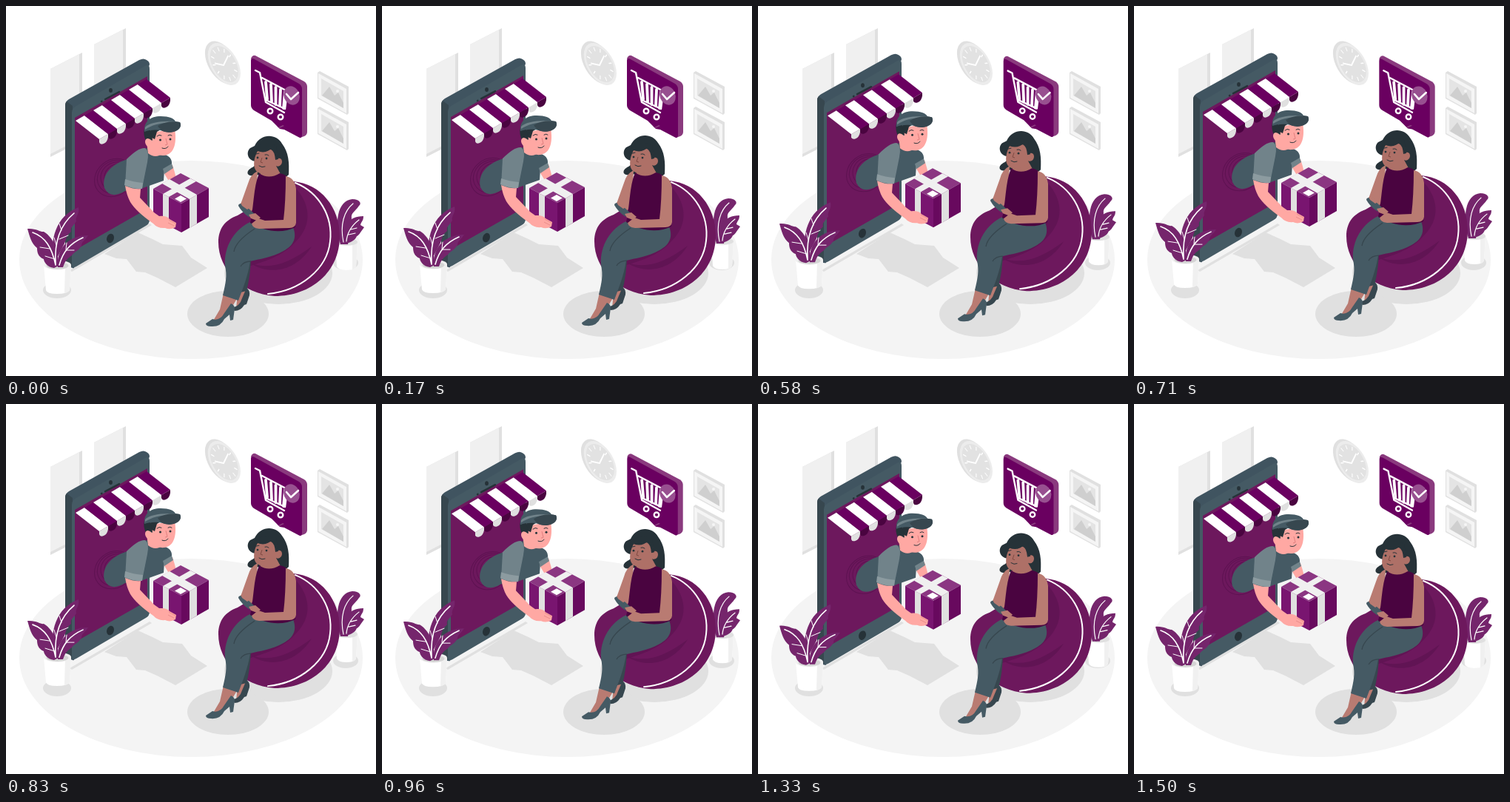
An HTML page that plays this animation: 500 by 500 pixels, repeating every 1.54 s.

```html
<!DOCTYPE html>
<html lang="en">
<head>
<meta charset="utf-8">
<title>Delivery from the screen</title>
<style>
  html, body { margin: 0; width: 100%; height: 100%; overflow: hidden; background: #fff; }
  svg { display: block; width: 100vw; height: 100vh; }
  .plum { fill: #6d185d; } .vivid { fill: #6a0060; } .deep { fill: #4a0440; } .lilac { fill: #8a3a7e; }
  .leaf { fill: #75256c; }
  .slate { fill: #455a64; } .dark { fill: #37474f; } .ink { fill: #263238; } .steel { fill: #71838a; }
  .pink { fill: #ffa8a3; } .tan { fill: #b97b72; } .brown { fill: #ae7067; }
  .grey { fill: #e0e0e0; } .pale { fill: #f0f0f0; } .white { fill: #fff; }
  .line { fill: none; stroke: #fff; stroke-linecap: round; stroke-linejoin: round; }
  .fine { fill: none; stroke: #263238; stroke-linecap: round; }
</style>
</head>
<body>
<svg viewBox="0 0 500 500">
  <defs>
    <g id="picture">
      <path class="grey" d="M421 90l3-2 39 21v36l-2 2-40-22z"/>
      <path fill="#f5f5f5" d="M422 91l38 21v33l-38-21z"/>
      <path fill="#e4e4e4" d="M426 98l30 17v23l-30-17z"/>
      <path fill="#cfcfcf" d="M427 121l10-12 7 12 5-4 7 14v7z"/>
      <circle cx="448" cy="115" r="2" fill="#f5f5f5"/>
    </g>
  </defs>

  <!-- room -->
  <ellipse cx="250" cy="343" rx="232" ry="134" fill="#f4f4f4"/>
  <g id="window">
    <path class="grey" d="M60 85l43-22v119l-43 22z"/>
    <path class="pale" d="M60 85l39-20v115l-39 20z"/>
  </g>
  <use href="#window" x="59" y="-33"/>
  <use href="#picture"/>
  <use href="#picture" y="48"/>
  <g transform="matrix(.866 .5 0 1 294 78)" id="clock">
    <circle cx="-3" r="26" class="grey"/>
    <circle cx="1" r="25.5" fill="#ececec"/>
    <circle cx="1" r="22" fill="#e2e2e2"/>
    <path class="line" stroke-width="1.8" d="M-13 6L0 2 7-14"/>
  </g>

  <!-- shadows -->
  <g class="grey">
    <path d="M86 357L194 294l3 2-108 63z"/>
    <path d="M133 335l45-29 20 9 14 7 26 2 12 16 22 14-43 26-25-13-16-7-12-1-13-17-14-1z"/>
    <ellipse cx="368" cy="361" rx="73" ry="42"/>
    <ellipse cx="300" cy="416" rx="55" ry="31"/>
    <ellipse cx="69" cy="384" rx="19" ry="11"/>
    <ellipse cx="459" cy="347" rx="17" ry="10"/>
  </g>

  <g id="bubble">
    <path class="lilac" d="M331 71q2-5 6-4l66 35q4 3 4 7v61q0 4-4 6l-6 2z"/>
    <path class="vivid" d="M331 74q0-5 5-2l60 33q4 3 4 7v62q0 6-5 3l-19-10-6 -1-11-11-24-14q-4-3-4-7z"/>
    <path class="vivid" d="M361 155l7 9 2 0 6-3z"/>
    <path class="lilac" d="M368 164l2 1 6-3-2-1z"/>
    <g class="line" stroke-width="2.4">
      <path d="M337 87l6 3 8 40 25 14M346 97l34 18-3 24-26-12"/>
      <path stroke-width="3.8" d="M351 103l2 23M358 106l1 23M364.500 110v23M371 113l-1 22M377 116l-2 22"/>
      <circle cx="357" cy="142" r="3.3"/>
      <circle cx="371" cy="150" r="3.3"/>
    </g>
    <ellipse cx="386" cy="121" rx="10.5" ry="13" transform="rotate(-22 386 121)" fill="#985090"/>
    <path class="line" stroke-width="2.6" d="M379 119l6 7 10-9"/>
  </g>

  <g id="float">
    <!-- tablet -->
    <path fill="#405460" d="M80 134q0-5 5-8L180 73q6-3 10 0 4 2 4 6L92 354q-4 1-7-3t-5-8z"/>
    <path class="dark" d="M80 134q0-3 2-5l8 6-1 217q-9-3-9-9z"/>
    <path class="slate" d="M89 144q0-6 6-9L188 81q6-3 6 4v204q0 5-5 8L95 352q-6 3-6-4z"/>
    <path class="plum" d="M93 151l98-56v179l-98 56z"/>
    <ellipse cx="141" cy="314" rx="4.800" ry="6.400" transform="rotate(20 141 314)" class="ink"/>
    <ellipse cx="141.500" cy="114" rx="2.400" ry="3" class="ink"/>
    <path class="fine" stroke-width="2.400" d="M134 126l19-10M129 129l.5-.3"/>
    <g id="ripples" fill="none" stroke="#5d1251"></g>
    <g id="awning"></g>

    <!-- courier -->
    <path class="pink" d="M211 222l14-7q3 9 5 18l-9 5z"/>
    <path class="slate" d="M133 246c-4-17 8-32 31-39l26-15 22 8q13 3 12 14l-10 7-1 15-28 10-24 4q-20 12-28-4z"/>
    <path class="steel" d="M212 220l12-7 2 6-12 8z"/>
    <path class="steel" d="M163 207q16-16 25-15 6 4 3 19l-7 35-23-3z"/>
    <path fill="#8c9ba0" d="M161 234q11 4 24 5l-1 8q-12 1-24-5z"/>
    <path class="pink" d="M190 184l2 15q10 8 20 0l1-10z"/>
    <path class="ink" d="M187 166l8 1 4 9-2 9-8-3q-4-9-2-16z"/>
    <path class="pink" d="M197 171l31-5c3 18 0 34-14 36-10 1-16-5-18-11-7 1-11-10-5-12 4 0 5 3 7 3z"/>
    <path class="ink" d="M195 167l16-1-7 4-3 10-4-2z"/>
    <path class="slate" d="M187 170c-1-14 8-21 22-21 12 0 18 3 20 7l6 1c5 10-12 17-23 12-8-2-17-2-25 1z"/>
    <path class="steel" d="M188 164c5-6 20-9 40-8l1 2c-17-1-31 2-41 9z"/>
    <path class="dark" d="M205 162q13-8 30-5c5 10-9 16-20 13q-6-1-10-8z"/>
    <circle cx="208.500" cy="181" r="1.500" class="ink"/>
    <circle cx="222" cy="180" r="1.500" class="ink"/>
    <path class="fine" d="M204 176q3-3 6-1M219 175q3-2 5 0M211 192q5 2 8-2"/>
    <path fill="none" stroke="#e07f7f" d="M216 179l2 8-3 1"/>

    <!-- parcel -->
    <path fill="#8b3682" d="M199 247l37-21 38 20-37 21z"/>
    <path fill="#791570" d="M199 247l38 20v39l-38-20z"/>
    <path fill="#68095e" d="M237 267l37-21v39l-37 21z"/>
    <path class="pale" d="M211 240l10-6 37 21-10 6zM212 254l37-21 8 4-37 21z"/>
    <path class="grey" d="M212 254l8 4v39l-8-4zM248 261l10-6v39l-10 6z"/>
    <path class="white" d="M228 260.500l8-4.500 8 4.500-8 4.500z"/>
    <path class="pink" d="M161 243q12 5 21 4l-1 12 19 20 7 5q10-1 14 4l9 5-1 6q-7 4-14 1-10 1-16-6-23-16-31-29-5-9-7-22z"/>
    <path fill="none" stroke="#e98d8b" d="M220 289l9 5M219 293l8 4"/>

    <!-- plants -->
    <path class="white" d="M51 350h37l-2 34q-3 5-17 5t-15-5z"/>
    <path class="pale" d="M80 352l8-2-2 34q-2 3-7 4z"/>
    <ellipse cx="69.500" cy="350" rx="18.500" ry="6.500" class="pale"/>
    <ellipse cx="69.500" cy="351" rx="15" ry="4.800" fill="#d4d4d4"/>
    <g class="leaf">
      <path d="M64 350c-5-35 3-66 34-78 2 9-5 13-3 19-5 8-8 7-7 14-8 6-6 10-9 16z"/>
      <path d="M65 354c-10-1-14-9-14-12-8-3-9-10-9-15-8-6-10-16-13-26 12-1 18 5 22 4 15 9 20 29 20 46z"/>
      <path d="M70 353c-2-24 13-43 41-43-4 7-9 8-9 14-6 9-10 8-13 13-6 4-9 7-12 16z"/>
    </g>
    <path class="line" stroke-width="1.600" d="M67 349c-2-32 7-54 25-69M67 350c-5-24-14-38-31-44M72 350c5-18 14-29 32-37"/>
    <path class="line" stroke-width="1" d="M68 323l-3-10M75 303l-3-9M72 315l12-5M59 328l-13-2M66 342l-13-4M81 329l1-9M81 330l11 0"/>

    <path class="white" d="M445 319h30l-2 33q-2 5-13 5t-13-5z"/>
    <path class="pale" d="M468 321l7-2-2 33q-1 3-5 4z"/>
    <ellipse cx="460" cy="319" rx="15" ry="5" class="grey"/>
    <g class="leaf">
      <path d="M452 322c-8-28-5-59 16-61 10 0 13 6 9 9-6 9-11 9-10 17l-5 35z"/>
      <path d="M456 322c-4-23 6-38 27-38 0 7-3 7-4 12l5 3c-5 7-8 12-10 12-2 6-9 9-18 11z"/>
    </g>
    <path class="line" stroke-width="1.200" d="M456 319c-5-24 1-42 13-52M460 318c1-12 8-22 17-29M463 309l9-2M466 302l8-2"/>

    <!-- bean bag -->
    <path class="plum" d="M388 237c38 3 63 36 63 74 0 48-38 81-88 81-44-3-76-36-76-73 0-18 9-30 26-36l30-18z"/>
    <path fill="#611454" d="M388 242c25 26 26 54 3 77-17 20-45 27-66 34l7-14 55-24z"/>
    <path fill="#611454" d="M329 347c27 10 52 2 84-22-20 32-55 41-84 22z"/>
    <path class="line" stroke-width="2" d="M391 239c32 13 51 45 47 79-4 38-41 67-84 71"/>

    <!-- customer -->
    <path class="dark" d="M316 340l15-4q0 28-7 53l-12 4z"/>
    <path class="tan" d="M313 388l12-3-2 15-12 9z"/>
    <path class="dark" d="M325 381q5 3 4 10l-4 12-3 1q-5 8-13 8l-4-4q11-2 14-13z"/>
    <path class="tan" d="M294 388l19 6-9 15-15 16-10 2 10-17z"/>
    <path class="slate" d="M304 402q5 2 5 7l-2 15-4 1-1-8-7 6q-5 11-18 10-7 0-7-4l9-6q10 3 16-8z"/>
    <path class="slate" d="M332 292q38 18 56 7c5 13 2 24-13 32-15 9-34 11-45 14-3 20-10 37-16 53l-21-7c4-17 6-26 3-40-2-27 14-50 34-59z"/>
    <path fill="none" stroke="#37474f" stroke-width="1.300" d="M336 301q-26 17-28 31M331 345q-10 0-14 7"/>
    <path class="ink" d="M336 189c8-17 29-17 37-3 9 12 10 25 9 42-7 8-23 3-37-1-11 4-21 3-18-4 4-6 10-4 11-13-12-1-14-13-8-18z"/>
    <path class="brown" d="M348 212l17 4 6 11q-9 12-30 2l7-7z"/>
    <path class="tan" d="M340 223q-10 5-13 17l-10 28q0 5 6 8l8 3 4-8 4-30z"/>
    <path class="deep" d="M342 226q13 9 28 0 10 2 13 9 8 16 8 64c-18 9-42 6-61-6 5-20 4-48 12-67z"/>
    <path class="brown" d="M340 196c8 3 15 1 20-5 7 5 7 10 6 16 5-4 9 2 6 7q-3 4-7 2c-2 9-15 13-24 9-8-4-7-18-1-29z"/>
    <path class="ink" d="M337 193q13-12 28-4l3 18-4 1q-1-12-6-14-12 2-18 1l-5 8q-2-5 2-10z"/>
    <circle cx="340" cy="205" r="1.400" class="ink"/>
    <circle cx="352" cy="206" r="1.400" class="ink"/>
    <path class="fine" d="M338 200l4-1M350 201q3-1 5 1M342 216q4 3 8 1"/>
    <path fill="none" stroke="#804a43" d="M346 205l-2 6 3 1"/>
    <path class="tan" d="M378 230q12 2 14 17v46q-1 7-9 7l-41 1q-9-1-10-7l9-7 9 3 25-1q3-25 3-59z"/>
    <path class="slate" d="M314 270q0-3 4-3 4 1 8 5l11 10q3 4-1 5l-8-2q-9-6-14-15z"/>
    <path class="tan" d="M317 266l7 1 5 6-3 2-7-5zM328 282l9-2 7 6-5 4-8-3z"/>
  </g>
</svg>
<script>
const LOOP = 1540;
const byId = id => document.getElementById(id);
const add = (id, tag, attrs) => {
  const node = document.createElementNS('http://www.w3.org/2000/svg', tag);
  for (const key in attrs) node.setAttribute(key, attrs[key]);
  byId(id).append(node);
};

for (let i = 0; i < 12; i++) {
  add('clock', 'path', { d: 'M1-20v4', class: 'line', 'stroke-width': 1.3, transform: `rotate(${i * 30} 1 0)` });
}
for (let i = 0; i < 4; i++) {
  add('ripples', 'ellipse', { cx: 146 + i * 2, cy: 232, rx: 28 - i * 3, ry: 24 - i * 2, transform: `rotate(${-40 + i * 12} 146 232)` });
}
for (let i = 0; i < 8; i++) {
  const x = 94 + i * 12, y = 155 - i * 7;
  add('awning', 'path', { d: `M${x + 32} ${y + 25}l12-7v4q-1 7-6 9t-6-2z`, class: i % 2 ? 'deep' : 'grey' });
  add('awning', 'path', { d: `M${x} ${y}l12-7 32 25-12 7z`, class: i % 2 ? 'vivid' : 'white' });
}

// Gentle pulse of the bubble: [time, scale]
const pulse = [[0, 1], [330, 1], [580, .982], [830, 1], [1130, .982], [1500, .982], [LOOP, 1]];
const scaleAt = t => {
  const k = pulse.findIndex(([time]) => time > t);
  const [t0, a] = pulse[k - 1], [t1, b] = pulse[k];
  return a + (b - a) * (t - t0) / (t1 - t0);
};

function draw() {
  const t = performance.now() % LOOP;
  const lift = 4 * (1 - Math.cos(2 * Math.PI * t / LOOP));
  byId('float').setAttribute('transform', `translate(0 ${-lift})`);
  byId('bubble').setAttribute('transform', `translate(369 120) scale(${scaleAt(t)}) translate(-369 -120)`);
  requestAnimationFrame(draw);
}
draw();
</script>
</body>
</html>
```
